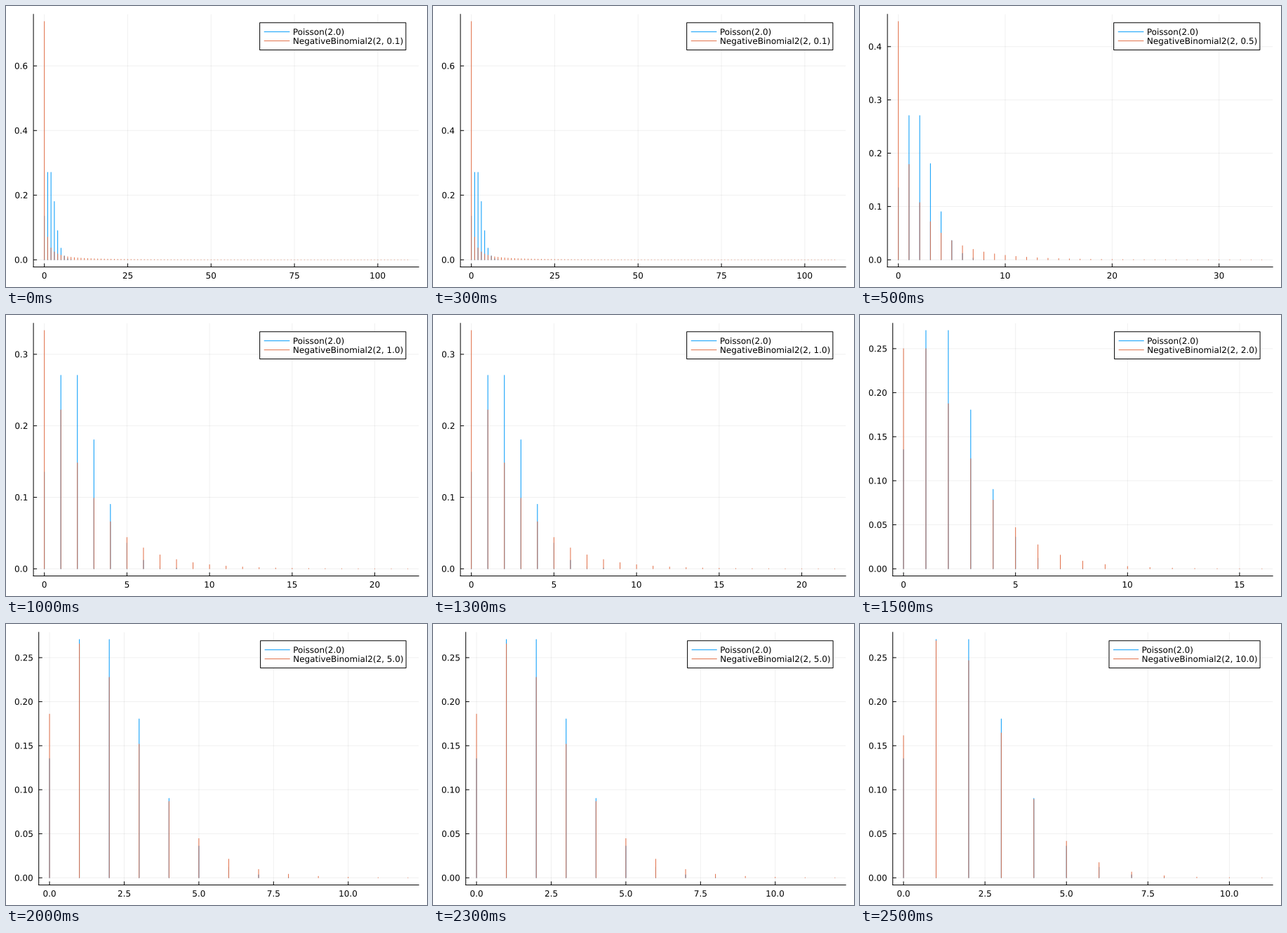
These frames come from a looping animation (600x400 px, 3000 ms). A matplotlib script:

```python
import math

import matplotlib.pyplot as plt
from matplotlib.animation import FuncAnimation
from matplotlib.lines import Line2D
from matplotlib.patches import PathPatch, Rectangle
from matplotlib.textpath import TextPath
from matplotlib.transforms import Affine2D

W, H, DPI = 600, 400, 100
PX = 72 / DPI
BLUE, ORANGE = "#009AFA", "#E36F47"
TOP, RIGHT, BOTTOM = 11.81, 588.19, 371.45
EM = 12
MEAN = 2

# dispersion, last k, x tick step, y tick step, y decimals
SCENES = [
    (0.1, 109, 25, 0.2, 1),
    (0.5, 34, 10, 0.1, 1),
    (1.0, 22, 5, 0.1, 1),
    (2.0, 16, 5, 0.05, 2),
    (5.0, 12, 2.5, 0.05, 2),
    (10.0, 11, 2.5, 0.05, 2),
]

plt.rcParams["font.family"] = "DejaVu Sans"
fig = plt.figure(figsize=(W / DPI, H / DPI), dpi=DPI, facecolor="white")
ax = fig.add_axes([0, 0, 1, 1])


def poisson(k):
    return math.exp(-MEAN) * MEAN**k / math.factorial(k)


def neg_binomial(k, phi):
    log_coef = math.lgamma(k + phi) - math.lgamma(k + 1) - math.lgamma(phi)
    p = phi / (MEAN + phi)
    return math.exp(log_coef + phi * math.log(p) + k * math.log(1 - p))


def line(x0, y0, x1, y1, color="black", cap="butt", z=3, alpha=1):
    seg = Line2D([x0, x1], [y0, y1], color=color, lw=PX, alpha=alpha,
                 solid_capstyle=cap, zorder=z)
    seg.set_snap(False)
    ax.add_line(seg)


def label(x, base, s, align="left", z=3):
    path = TextPath((0, 0), s, size=EM)
    box = path.get_extents()
    shift = {"left": 0, "center": (box.x0 + box.x1) / 2, "right": box.x1}[align]
    place = Affine2D().scale(1, -1).translate(x - shift, base)
    ax.add_patch(PathPatch(place.transform_path(path), fc="black", lw=0,
                           zorder=z, snap=False))


def ticks(step, top):
    return [i * step for i in range(int(top / step + 1e-9) + 1)]


def legend(left, names):
    unit = (RIGHT - left) / 45
    right = RIGHT - (RIGHT - left) / 30
    y0 = TOP + (BOTTOM - TOP) / 30
    row = 12.93
    text_w = max(TextPath((0, 0), s, size=EM).get_extents().x1 for s in names)
    x0 = right - text_w - 4.25 * unit
    ax.add_patch(Rectangle((x0, y0), right - x0, 3 * row, fc="white",
                           ec="black", lw=PX, zorder=5, snap=False))
    for i, (s, color) in enumerate(zip(names, (BLUE, ORANGE)), 1):
        y = y0 + i * row
        line(x0 + 0.5 * unit, y, x0 + 3.5 * unit, y, color, z=6)
        label(x0 + 3.87 * unit, y + 4.37, s, z=6)


def draw(n):
    phi, last, x_step, y_step, digits = SCENES[n]
    ax.clear()
    ax.set_xlim(0, W)
    ax.set_ylim(H, 0)
    ax.axis("off")

    series = [
        ([poisson(k) for k in range(9)], BLUE),
        ([neg_binomial(k, phi) for k in range(last + 1)], ORANGE),
    ]
    peak = max(max(values) for values, _ in series)
    left = 39.1 if digits == 1 else 46.7

    # The data range is widened by 3 % on each side.
    def px(v):
        return left + (RIGHT - left) * (v / last + 0.03) / 1.06

    def py(v):
        return BOTTOM - (BOTTOM - TOP) * (v / peak + 0.03) / 1.06

    for v in ticks(x_step, last * 1.03):
        x = px(v)
        line(x, TOP, x, BOTTOM, z=1, alpha=0.06)
        line(x, BOTTOM, x, BOTTOM - 5)
        label(x, 388.0, f"{v:.1f}" if x_step == 2.5 else f"{v}", "center")
    for v in ticks(y_step, peak * 1.03):
        y = py(v)
        line(left, y, RIGHT, y, z=1, alpha=0.06)
        line(left, y, left + 5, y)
        label(left - 8.8, y + 4.4, f"{v:.{digits}f}", "right")
    line(left, TOP, left, BOTTOM, cap="projecting")
    line(left, BOTTOM, RIGHT, BOTTOM, cap="projecting")

    for values, color in series:
        for k, v in enumerate(values):
            line(px(k), py(0), px(k), py(v), color, cap="round", z=4)

    legend(left, [f"Poisson({MEAN:.1f})", f"NegativeBinomial2({MEAN}, {phi})"])
    return []


anim = FuncAnimation(fig, draw, frames=len(SCENES), init_func=lambda: draw(0),
                     interval=500, repeat=True, repeat_delay=0)
plt.show()
```
